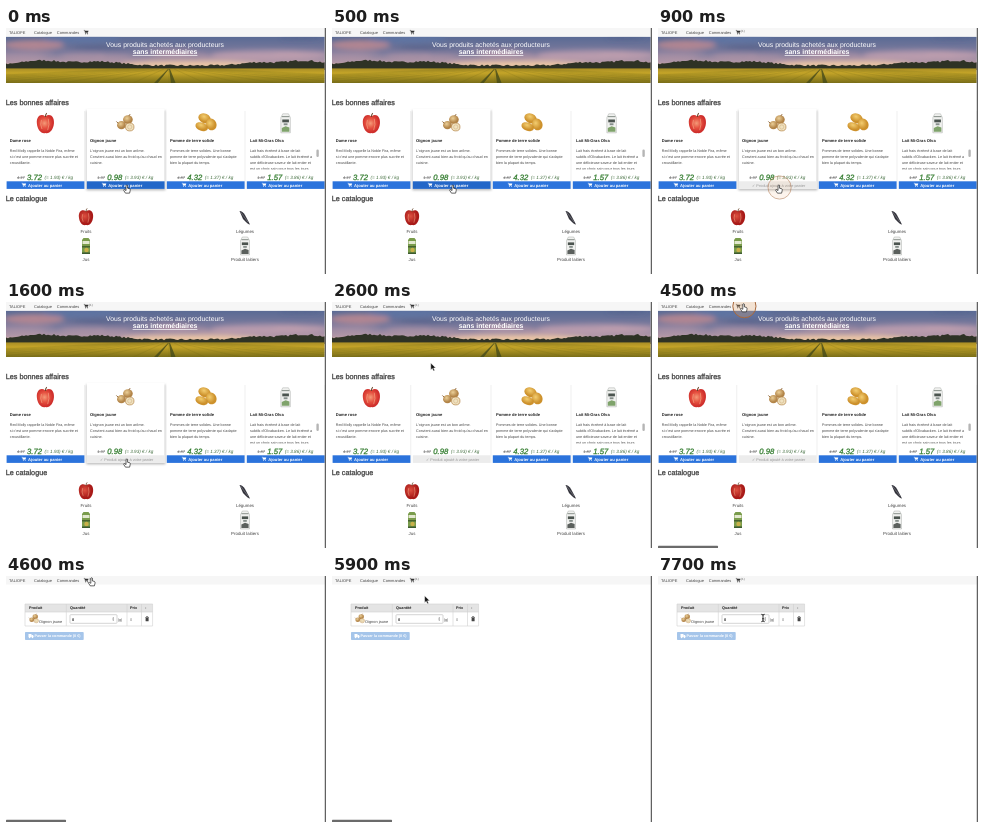
Write an HTML page that moves like this. It is 320 px wide and 246 px high and loops after 8 s.

```html
<!DOCTYPE html>
<html lang="fr">
<head>
<meta charset="utf-8">
<title>Boutique</title>
<style>
html, body { margin: 0; width: 100%; height: 100%; overflow: hidden; background: #fff; }
svg { display: block; width: 100vw; height: 100vh; font-family: "Liberation Sans", Arial, sans-serif; text-rendering: geometricPrecision; }
.b { font-weight: bold; }
</style>
</head>
<body>
<svg id="stage" viewBox="0 0 320 246" preserveAspectRatio="none">
<defs>
  <linearGradient id="sky" x2="0" y2="1">
    <stop offset="0" stop-color="#596a94"/><stop offset=".5" stop-color="#7c7a9c"/>
    <stop offset=".8" stop-color="#b096a6"/><stop offset="1" stop-color="#dfb59c"/>
  </linearGradient>
  <linearGradient id="field" x2="0" y2="1">
    <stop offset="0" stop-color="#a88d26"/><stop offset=".3" stop-color="#c4a428"/><stop offset="1" stop-color="#776c18"/>
  </linearGradient>
  <radialGradient id="red" cx=".45" cy=".45"><stop offset="0" stop-color="#f49a78"/><stop offset=".55" stop-color="#e5503f"/><stop offset="1" stop-color="#cf2f2c"/></radialGradient>
  <radialGradient id="dark" cx=".4" cy=".4"><stop offset="0" stop-color="#dd5040"/><stop offset="1" stop-color="#a81a18"/></radialGradient>
  <radialGradient id="gold" cx=".4" cy=".35"><stop offset="0" stop-color="#ebcf98"/><stop offset="1" stop-color="#b28448"/></radialGradient>
  <radialGradient id="tan" cx=".4" cy=".35"><stop offset="0" stop-color="#f3cd70"/><stop offset="1" stop-color="#cd912c"/></radialGradient>
  <filter id="soft" x="-30%" y="-100%" width="160%" height="300%"><feGaussianBlur stdDeviation="2.4"/></filter>
  <filter id="shade"><feGaussianBlur stdDeviation="1.3"/></filter>
  <clipPath id="hero"><rect y="8.5" width="318.6" height="46.5"/></clipPath>
  <clipPath id="desc"><rect x="240" y="118" width="74" height="23.5"/></clipPath>
  <symbol id="cart" overflow="visible">
    <path d="M0 .4h1l.6 2.6h2.7" fill="none" stroke="currentColor" stroke-width=".55"/>
    <path d="M1 .8h4l-.6 1.9H1.5z" fill="currentColor"/>
    <circle cx="1.9" cy="4" r=".55" fill="currentColor"/><circle cx="4" cy="4" r=".55" fill="currentColor"/>
  </symbol>
  <symbol id="apple" overflow="visible">
    <path d="M0-6C4-9 8-6 7.500 0C7 6 3.500 9.500 0 8.500C-3.500 9.500-7 6-7.500 0C-8-6-4-9 0-6z"/>
    <path d="M0-5.500Q0-8 1.200-9" fill="none" stroke="#69452a" stroke-width=".9"/>
    <path d="M-3.500-3Q-5 1-3 5M2.500-4Q4 1 2 6" fill="none" stroke="#f8b894" stroke-width=".8" opacity=".6"/>
  </symbol>
  <symbol id="onion" overflow="visible">
    <ellipse cx="2.500" cy="-4" rx="5.300" ry="4.800" fill="url(#gold)"/>
    <ellipse cx="-4.500" cy="2" rx="4.800" ry="4.500" fill="url(#gold)"/>
    <ellipse cx="4.500" cy="4" rx="4.600" ry="4.300" fill="#f0e2c0" stroke="#b88a50" stroke-width=".8"/>
    <ellipse cx="4.500" cy="4" rx="2.300" ry="2.300" fill="none" stroke="#cfb080" stroke-width=".6"/>
    <path d="M3.500-8l1.500-2M-8 0l-2-2" stroke="#8c6232" stroke-width="1"/>
  </symbol>
  <symbol id="potato" overflow="visible">
    <ellipse cx="-3" cy="-4" rx="6.500" ry="4.800" transform="rotate(25)" fill="url(#tan)"/>
    <ellipse cx="5" cy="3" rx="5.200" ry="6" transform="rotate(-20)" fill="url(#tan)"/>
    <ellipse cx="-2.500" cy="4.500" rx="6.500" ry="4.200" transform="rotate(20)" fill="url(#tan)"/>
  </symbol>
  <symbol id="milk" overflow="visible">
    <path d="M-5-6l2-4h6L5-6V10H-5z" fill="#f0f1ef" stroke="#a3a9a4" stroke-width=".5"/>
    <path d="M-4-7h8" stroke="#7d8680" stroke-width="1"/>
    <rect x="-3.500" y="-4" width="7" height="3" fill="#4b544f"/>
    <path d="M-4 9V5l4-2 4 1.500V9z" fill="currentColor"/>
    <rect x="-2" y="0" width="4" height="2" fill="#858e8a"/>
  </symbol>
  <symbol id="juice" overflow="visible">
    <path d="M-4-6l1.500-2h5L4-6V8h-8z" fill="#7a9c4c"/>
    <rect x="-3.500" y="-5" width="7" height="3" fill="#e3e8cf"/>
    <path d="M-4 0h8v1.500h-8z" fill="#46632f"/>
    <circle cx=".5" cy="4" r="2.200" fill="#c9b04a"/><rect x="-4" y="6.500" width="8" height="1.500" fill="#3c5b2f"/>
  </symbol>
</defs>
<rect width="320" height="246" fill="#fff"/>
<g id="shop"></g>
<g id="basket"></g>
<g id="nav"></g>
<rect id="status" y="243.800" width="60" height="2.200" rx=".6" fill="#6b6b6b"/>
<path d="M319.300 0V246" stroke="#3a3a3a" stroke-width="1"/>
<circle id="ring" r="11.600" fill="#eba868" fill-opacity=".25" stroke="#a8683c" stroke-width="1"/>
<g id="pointer" stroke-linejoin="round">
  <path id="hand" transform="scale(.85)" d="M-.9 0Q0-1 .9 0V3.200L3.400 3.800Q4.300 4.200 4 6L3.300 9H-1.600L-3.600 5.800Q-3.800 4.500-2.600 4.800L-.9 6z" fill="#fff" stroke="#111" stroke-width=".75"/>
  <path id="arrow" d="M0 0V7L1.600 5.500L2.700 8L4 7.400L2.900 5H5.100z" fill="#111" stroke="#fff" stroke-width=".5"/>
  <path id="beam" d="M-1.700-3.700Q0-3.700 0-2.700Q0-3.700 1.700-3.700M0-3V3M-1.700 3.700Q0 3.700 0 2.700Q0 3.700 1.700 3.700M-.9.8H.9" fill="none" stroke="#111" stroke-width=".85"/>
</g>
</svg>
<script>
const LOOP = 8000, ADDED = 900, OPEN = 4600;
const el = id => document.getElementById(id);
const text = (x, y, size, str, fill = '#444', extra = '') =>
  `<text x="${x}" y="${y}" font-size="${size}" fill="${fill}" ${extra}>${str}</text>`;
const rect = (x, y, w, h, fill, extra = '') =>
  `<rect x="${x}" y="${y}" width="${w}" height="${h}" fill="${fill}" ${extra}/>`;
const icon = (id, x, y, s = 1, color = '#333', fill = 'url(#red)') =>
  `<use href="#${id}" transform="translate(${x} ${y}) scale(${s})" color="${color}" fill="${fill}"/>`;
const MID = 'text-anchor="middle"', BOLD = 'class="b"';

function hero() {
  let seed = 7;
  const rnd = () => (seed = seed * 16807 % 2147483647) / 2147483647;
  const hill = (x, at, w) => Math.exp(-(((x - at) / w) ** 2));
  const glow = (x, y, rx, ry, fill, o) => `<ellipse cx="${x}" cy="${y}" rx="${rx}" ry="${ry}" fill="${fill}" opacity="${o}"/>`;
  let clouds = '', trees = 'M0 42V36', rows = '';
  for (let i = 0; i < 16; i++) {
    const y = 10 + rnd() * 22;
    clouds += glow(rnd() * 320, y, 14 + rnd() * 24, 1 + rnd() * 2, y < 20 ? '#48557f' : '#cfa3ad', .4);
  }
  for (let x = 0; x <= 320; x += 2) {
    const h = 1 + 5 * hill(x, 34, 28) + 4 * hill(x, 92, 32) + 3 * hill(x, 250, 22) + 5 * hill(x, 298, 28);
    trees += `L${x} ${39.4 - h - rnd() * 1.8}`;
  }
  for (let i = -9; i <= 9; i++)
    rows += `M${163 + i * 5} 41L${163 + i * 38} 56`;
  return `<g clip-path="url(#hero)">${rect(0, 8.5, 320, 32, 'url(#sky)')}
    <g filter="url(#soft)">${clouds}
      ${glow(28, 17, 30, 5, '#c98c90', .75)}${glow(75, 11, 40, 4, '#5f78a8', .7)}
      ${glow(265, 27, 60, 5, '#c8a4b2', .7)}${glow(185, 37, 70, 4, '#f2cda6', .85)}</g>
    <path d="${trees}V42z" fill="#2e3225"/>${rect(0, 40.4, 320, 15, 'url(#field)')}
    <path d="${rows}" stroke="#6a6719" stroke-width=".7" opacity=".25"/>
    <path d="M162 41L147 56H151L162.800 41zM163.200 41L165 56H170L164 41z" fill="#454a1a" opacity=".8"/></g>` +
    text(159, 18.9, 6.82, 'Vous produits achetés aux producteurs', '#fff', MID) +
    text(159, 26, 6.9, 'sans intermédiaires', '#fff', MID + ' class="b" text-decoration="underline"');
}

const goods = [
  [.6, 'apple', 'Dame rose', '4.37', '3.72', '1.93',
    ['Red Molly rappelle la Noble Fira, même', 'si c’est une pomme encore plus sucrée et', 'croustillante.']],
  [80.800, 'onion', 'Oignon jaune', '1.37', '0.98', '3.93',
    ['L’oignon jaune est un bon arôme.', 'Convient aussi bien au froid qu’au chaud en', 'cuisine.']],
  [160.800, 'potato', 'Pomme de terre solide', '4.87', '4.32', '1.37',
    ['Pommes de terre solides. Une bonne', 'pomme de terre polyvalente qui s’adapte', 'bien la plupart du temps.']],
  [240.800, 'milk', 'Lait Mi-Gras Olva', '1.87', '1.57', '3.86',
    ['Lait frais écrémé à base de lait', 'subtils d’Olvabacken. Le lait écrémé a', 'une délicieuse saveur de lait entier et', 'est un choix sain pour tous les jours']]
];
const scales = { apple: 1.14, onion: .92, potato: 1, milk: .95 };

function card([x, pic, name, old, price, unit, lines], i) {
  const w = 77.8, tx = x + 3.2, hot = i == 1;
  const body = lines.map((s, n) => text(tx, 123.6 + n * 6.1, 3.7, s)).join('');
  return (hot ? `<rect id="glow" x="80.400" y="82.500" width="79" height="79.800" fill="#777" opacity=".5" filter="url(#shade)"/>` : '') +
    rect(x, 81, w, 80, '#fff') + rect(x + w, 83, .8, 78, '#ebebeb') +
    icon(pic, x + 38.8, 95.3, scales[pic], '#7fa36b') + text(tx, 113.7, 4.1, name, '#222', BOLD) +
    (i == 3 ? `<g clip-path="url(#desc)">${body}</g>` + rect(310.4, 121.5, 2.4, 7.5, '#b5b5b5', 'rx="1.2"') : body) +
    text(x + 10.5, 151, 3.9, old, '#555', 'text-decoration="line-through" font-style="italic"') +
    text(x + 20.5, 151.5, 7.7, price, '#2f7a2b', 'font-style="italic" stroke="#2f7a2b" stroke-width=".25"') +
    text(x + 38, 151, 4.6, `(= ${unit}) € / kg`, '#3d6a3a', 'font-style="italic"') +
    rect(x, 153.3, w, 7.6, '#2b73dc', hot ? 'id="buy"' : '') +
    `<g ${hot ? 'id="add"' : ''}>` + icon('cart', x + 15, 154.8, .9, '#fff') +
    text(x + 21.4, 158.6, 4.15, 'Ajouter au panier', '#fff', BOLD) + '</g>' +
    (hot ? `<g id="done">${text(94, 158.5, 3.9, '✓ Produit ajouté à votre panier', '#979797')}</g>` : '');
}

const label = (x, y, s) => text(x, y, 4.4, s, '#444', MID);
const title = (y, s) => text(-.3, y, 7.25, s, '#444', 'stroke="#444" stroke-width=".3"');

el('shop').innerHTML = hero() + title(76.6, 'Les bonnes affaires') +
  goods.map(card).join('') + title(173, 'Le catalogue') +
  icon('apple', 80, 189, .95, '#333', 'url(#dark)') + label(80, 205, 'Fruits') +
  `<path d="M233.500 183Q236.500 183 239 187L244 196.500Q242 196.500 237 191z" fill="#33333b"/>
   <path d="M234.500 184L242 194" stroke="#8a8a92" stroke-width=".6"/>` + label(239, 205, 'Légumes') +
  icon('juice', 80, 218) + label(80, 233, 'Jus') +
  icon('milk', 239, 218, .9, '#5b605d') + label(239, 233, 'Produit laitiers');

el('basket').innerHTML = rect(19, 28, 127.6, 22, '#fff') + rect(19, 28, 127.6, 8, '#e4e4e4') +
  '<path d="M19 28H146.600V50H19zM19 36H146.600M60.300 28V50M121 28V50M135.500 28V50" fill="none" stroke="#d0d0d0" stroke-width=".6"/>' +
  [[23, 'Produit'], [64, 'Quantité'], [124, 'Prix'], [139, '-']].map(([x, s]) => text(x, 33.3, 3.8, s, '#222', BOLD)).join('') +
  icon('onion', 28, 42.700, .5) + text(33, 47.4, 3.9, 'Oignon jaune') +
  rect(64, 38.700, 47, 8.600, '#fff', 'rx=".8" stroke="#b8b8b8" stroke-width=".6"') +
  text(66, 44.6, 3.9, '0', '#222', BOLD) +
  '<path d="M106.300 42.400l.9-1.300.9 1.300zM106.300 43.600l.9 1.300.9-1.300z" fill="#777"/>' +
  text(111.8, 44.6, 3.7, '(g)') + text(124, 44.6, 3.9, '0', '#777') +
  '<path d="M139.200 41.500h3.800M140.500 41v-.5h1.200v.5" stroke="#333" stroke-width=".6" fill="none"/>' +
  rect(139.6, 42, 3, 3.3, '#444', 'rx=".3"') +
  rect(19, 56, 58.7, 8, '#a5c5ea', 'rx=".8"') +
  '<path d="M22.500 58h3v3.200h-3zM25.700 59h1.200l.7 1v1.200h-1.900z" fill="#fff"/><circle cx="23.600" cy="61.500" r=".7" fill="#fff"/><circle cx="26.500" cy="61.500" r=".7" fill="#fff"/>' +
  text(28.5, 61.4, 3.75, 'Passer la commande (0 €)', '#fff', BOLD);

el('nav').innerHTML = rect(0, 0, 319, 8.5, '#f6f6f6') +
  [[3, 'TALIOPE'], [28, 'Catalogue'], [50.8, 'Commandes']].map(([x, s]) => text(x, 5.9, 3.95, s)).join('') +
  icon('cart', 77.8, 2, .95) + `<g id="count">${text(83, 3.6, 3, '(1)', '#555')}</g>`;

// Pointer stops: time, x, y of the tip (or the beam's centre)
const stops = [
  [0, 120.800, 157.500], [1700, 120.800, 157.500], [3200, 86.800, 8.800], [3400, 86.800, 8.800],
  [3800, 85.600, 2.200], [5600, 85.600, 2.200], [5900, 92.600, 19.800], [6400, 103.500, 39.500],
  [6500, 103.500, 39.500], [6800, 104.200, 40.800], [7650, 104.200, 40.800], [7700, 105, 42], [LOOP, 105, 42]
];
const smooth = k => k * k * (3 - 2 * k);
const clamp = v => Math.max(0, Math.min(1, v));

function place(t) {
  const i = stops.findIndex(s => s[0] > t), [t0, x0, y0] = stops[i - 1], [t1, x1, y1] = stops[i];
  const k = smooth((t - t0) / (t1 - t0));
  return [x0 + (x1 - x0) * k, y0 + (y1 - y0) * k];
}
const show = (id, on) => el(id).setAttribute('visibility', on ? 'inherit' : 'hidden');
const fade = (id, v) => el(id).setAttribute('opacity', v);

function draw(t) {
  const [x, y] = place(t), shop = t < OPEN, added = t >= ADDED;
  const onCard = shop && y > 81, onBuy = shop && y > 152;
  const onLink = t >= 3400 && t < 5800 && y < 7.5, typing = t >= 6300;
  show('shop', shop);
  show('basket', !shop);
  show('glow', onCard);
  show('add', !added);
  show('done', added);
  show('count', added);
  el('buy').setAttribute('fill', added ? '#ececec' : onBuy ? '#2367c8' : '#2b73dc');
  el('pointer').setAttribute('transform', `translate(${x} ${y})`);
  show('hand', onBuy || onLink);
  show('beam', typing);
  show('arrow', !onBuy && !onLink && !typing);
  fade('status', clamp((t - 3700) / 200) * clamp((6300 - t) / 200));
  const click = t < 3000 ? t - 600 : t - 4400;
  fade('ring', click < 0 || (t > 3000 && !shop) ? 0 : clamp((400 - click) / 200));
  el('ring').setAttribute('transform', `translate(${x + .8} ${y + 2})`);
}

function tick(now) {
  draw(now % LOOP);
  requestAnimationFrame(tick);
}
draw(0);
requestAnimationFrame(tick);
</script>
</body>
</html>
```
